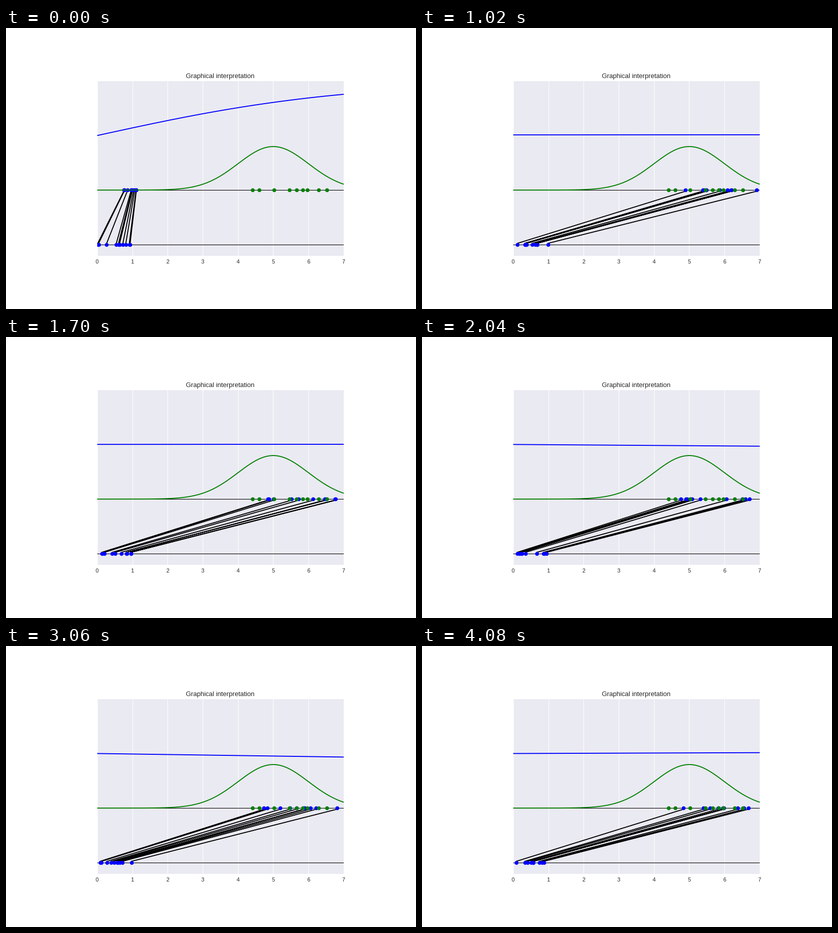
Write a matplotlib script that moves like this. It is 800x550 px and loops after 4.25 s.

```python
import numpy as np
import matplotlib.pyplot as plt
from matplotlib.animation import FuncAnimation

W, H, DPI = 800, 550, 100
ZOOM = 1.077 * 72 / DPI  # style sizes in points, scaled to the stage
LEFT, RIGHT, TOP, BOTTOM = 177.9, 658.9, 103.6, 445.5
FRAMES, STEP = 25, 170
BATCH = 10
INK = "0.15"
REAL = [4.41, 4.60, 5.025, 5.463, 5.665, 5.84, 5.97, 6.29, 6.525]

plt.rcParams["font.family"] = "Liberation Sans"
grid_x = np.linspace(0, 7, 200)


def sway(step, mid, amp, period, peak):
    return mid + amp * np.cos(2 * np.pi * (step - peak) / period)


def generator(step):
    """Offset and scale: quick training at first, then a slow drift."""
    untrained = np.exp(-step ** 2 / 2)
    offset = sway(step, 4.56, 0.075, 21, 3) - 3.857 * untrained
    return offset, 2.34 - 1.955 * untrained


def discriminator(step):
    """Bias and slope: steep at first, then swinging around flat."""
    bias = 0.0845 * step * np.exp(-step / 1.94)
    slope = sway(step, -0.009, 0.0135, 16, 8) + 0.304 * np.exp(-step ** 2 / 2)
    return bias, slope


def noise(step):
    return np.random.default_rng(step).random(BATCH)


fig = plt.figure(figsize=(W / DPI, H / DPI), dpi=DPI, facecolor="white")
ax = fig.add_axes([LEFT / W, 1 - BOTTOM / H,
                   (RIGHT - LEFT) / W, (BOTTOM - TOP) / H])
ax.set_facecolor("#EAEAF2")
ax.set_xlim(0, 7)
ax.set_ylim(-1.2, 2)
ax.set_yticks([])
ax.set_axisbelow(True)
ax.grid(axis="x", color="white", lw=ZOOM)
ax.tick_params(length=0, pad=7.3 * ZOOM, labelsize=10 * ZOOM, labelcolor=INK)
ax.spines[:].set_visible(False)
ax.set_title("Graphical interpretation", fontsize=12 * ZOOM, color=INK,
             pad=5 * ZOOM)

for level in (0, -1):
    ax.axhline(level, color="black", lw=ZOOM, zorder=2)


def curve(color, zorder):
    return ax.plot([], [], color=color, lw=1.75 * ZOOM,
                   solid_capstyle="round", zorder=zorder)[0]


def dots(color, zorder):
    return ax.plot([], [], "o", color=color, ms=7 * ZOOM, mew=0,
                   zorder=zorder)[0]


links = curve("black", 3)
latent = dots("blue", 4)
fake = dots("blue", 4)
judge = curve("blue", 5)
density = curve("green", 5)
real = dots("green", 6)

density.set_data(grid_x, 2 * np.exp(-(grid_x - 5) ** 2 / 2) / np.sqrt(2 * np.pi))
real.set_data(REAL, np.zeros(len(REAL)))


def draw(step):
    offset, scale = generator(step)
    bias, slope = discriminator(step)
    z = noise(step)
    x = offset + scale * z
    # NaN breaks the single line into one segment per sample
    links.set_data(np.column_stack([z, x, np.full(BATCH, np.nan)]).ravel(),
                   np.tile([-0.975, -0.02, np.nan], BATCH))
    latent.set_data(z, np.full(BATCH, -1))
    fake.set_data(x, np.zeros(BATCH))
    judge.set_data(grid_x, 2 / (1 + np.exp(-(bias + slope * grid_x))))
    return links, latent, fake, judge


anim = FuncAnimation(fig, draw, frames=FRAMES, interval=STEP,
                     init_func=lambda: draw(0), repeat=True, repeat_delay=0)
plt.show()
```
